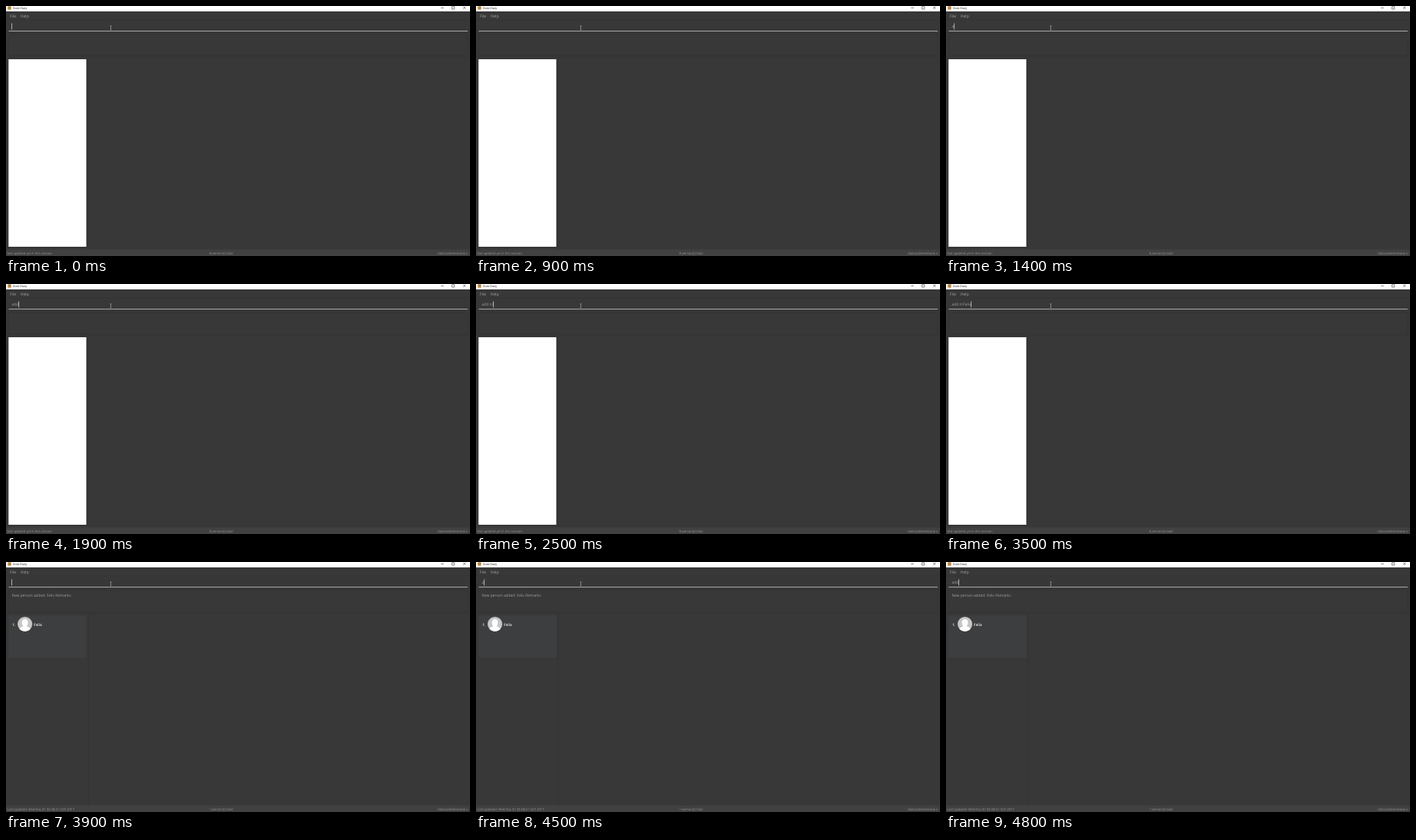
An HTML page for the animation above (5000 ms loop, 600 px wide and 324 px high).

```html
<!DOCTYPE html>
<html lang="en">
<head>
<meta charset="utf-8">
<title>Dusk Diary</title>
<style>
  html, body { margin: 0; width: 100%; height: 100%; overflow: hidden; background: #383838; }
  svg { display: block; }
  text {
    font: 300 5px "Open Sans", "Noto Sans", sans-serif;
    fill: #d2d2d2;
    white-space: pre;
    text-rendering: geometricPrecision;
  }
  .title { font-size: 3.55px; font-weight: 400; fill: #111; }
  .menu { font-size: 5.4px; }
  .status text { font-size: 4.22px; fill: #c4c4c4; }
  .card text { font-size: 4.8px; font-weight: 600; fill: #f0f0f0; }
  .frame { fill: none; stroke: #323232; stroke-width: .6; }
</style>
</head>
<body>
<svg width="600" height="324" viewBox="0 0 600 324">
  <rect width="600" height="324" fill="#383838"/>

  <!-- title bar -->
  <rect width="600" height="7" fill="#fff"/>
  <rect x="2.3" y=".3" width="4.4" height="4.4" fill="#b8873a"/>
  <text class="title" x="9" y="3.9">Dusk Diary</text>
  <path d="M562.5 2.5h3.5M576.7 .8h3.2v3.2h-3.2zM591.2 .7l3.2 3.2m0-3.2l-3.2 3.2"
        fill="none" stroke="#333" stroke-width=".6"/>

  <!-- menu and panes -->
  <text class="menu" x="5" y="14.8">File</text>
  <text class="menu" x="18.5" y="14.8">Help</text>
  <path class="frame" d="M0 18.3H600M3.3 36.5H597V64.5H3.3zM0 66.5H600M106.5 67V315"/>
  <path d="M3.5 32.5H597" stroke="#b4b4b4" stroke-width=".9"/>

  <!-- command box -->
  <text id="command" x="7.6" y="28.4"></text>
  <rect id="caret" y="22.5" width=".8" height="8" fill="#d0d0d0"/>
  <path d="M134.5 25.8h2M135.5 25.8v4.8M134.5 30.6h2" fill="none" stroke="#b5b5b5" stroke-width=".6"/>

  <rect id="blank" x="3.3" y="69" width="100.5" height="243" fill="#fff"/>

  <g id="added">
    <text x="7.6" y="44.5">New person added: Felix Remarks:</text>
    <g class="card">
      <rect x="3.3" y="69" width="100.5" height="55" fill="#3c3e3f"/>
      <text x="8.3" y="82.5">1.</text>
      <circle cx="24.5" cy="80.5" r="9.5" fill="#c6c6c6"/>
      <path d="M17.6 87C18 84.8 20 84.2 22.4 83.3C19.5 80 20 74 24.5 74S29.5 80 26.6 83.3C29 84.2 31 84.8 31.4 87A9.5 9.5 0 0 1 17.6 87z" fill="#fff"/>
      <text x="36" y="82.5">Felix</text>
    </g>
  </g>

  <!-- status bar -->
  <svg class="status" width="597.6" height="324">
    <rect y="315.5" width="600" height="8.5" fill="#414141"/>
    <text id="updated" x="1.4" y="321.8"></text>
    <text id="total" x="262.8" y="321.8"></text>
    <text x="557" y="321.8">./data/addressbook.xml</text>
  </svg>
  <rect x="597.6" y="315.5" width="2.4" height="8.5" fill="#414141"/>
</svg>

<script>
const $ = id => document.getElementById(id);
const LOOP = 5000, ENTER = 3900;

// [start time, typed text, caret hidden]
const steps = [
  [0, ""], [900, "", true],
  [1400, "a"], [1700, "ad"], [1900, "add"], [2000, "add "],
  [2200, "add n"], [2500, "add n/"], [3000, "add n/F"],
  [3200, "add n/Fe"], [3300, "add n/Fel"], [3400, "add n/Feli"], [3500, "add n/Felix"],
  [ENTER, ""], [4300, "", true],
  [4500, "a"], [4700, "ad"], [4800, "add"]
];

const show = (id, on) => $(id).setAttribute("visibility", on ? "visible" : "hidden");

function draw(now) {
  const t = now % LOOP;
  const [, typed, hidden] = steps.findLast(step => step[0] <= t);
  const added = t >= ENTER;

  $("command").textContent = typed;
  const width = typed ? $("command").getComputedTextLength() : -.5;
  $("caret").setAttribute("x", 7.6 + width);
  show("caret", !hidden);

  show("blank", !added);
  show("added", added);
  $("updated").textContent = added
    ? "Last Updated: Wed Nov 01 02:08:41 SGT 2017"
    : "Not updated yet in this session";
  $("total").textContent = `${added ? 1 : 0} person(s) total`;
}

const start = performance.now();
function tick() {
  draw(performance.now() - start);
  requestAnimationFrame(tick);
}
tick();
</script>
</body>
</html>
```
